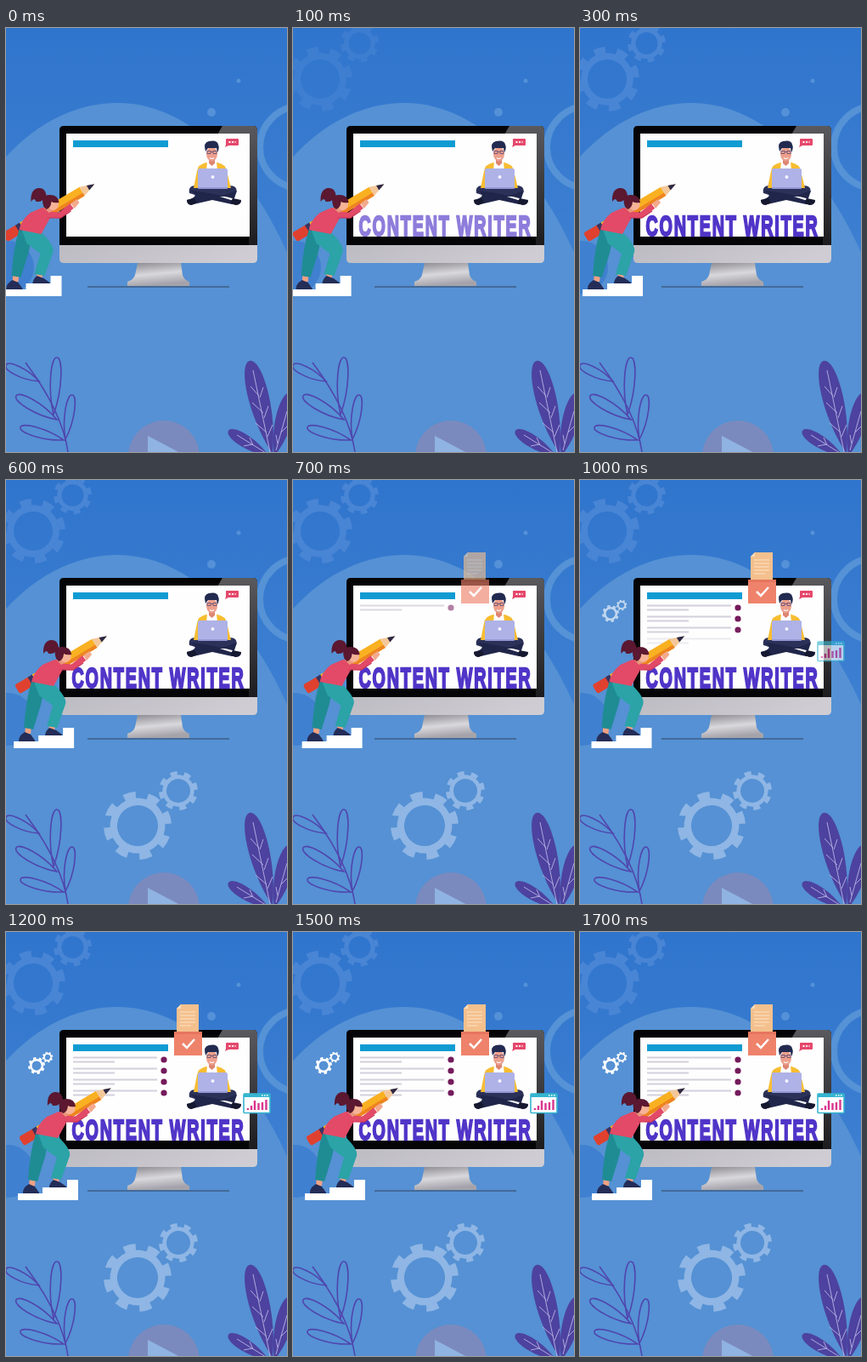
Animation of 331x498 px, one loop 1900 ms. Source, as an HTML page:

```html
<!DOCTYPE html>
<html lang="en">
<head>
<meta charset="utf-8">
<title>Content writer</title>
<style>
  html, body { margin: 0; width: 100%; height: 100%; overflow: hidden; background: #5591d4; }
  svg { display: block; width: 331px; height: 498px; }
  #title { font: bold 32.5px "Liberation Sans", Arial, sans-serif; letter-spacing: 3px; }
</style>
</head>
<body>
<svg viewBox="0 0 331 498">
  <defs>
    <linearGradient id="sky" x2="0" y2="1">
      <stop stop-color="#3075cd"/><stop offset=".6" stop-color="#3f81d2"/>
    </linearGradient>
    <linearGradient id="chin" x2="1" y2=".2">
      <stop stop-color="#bdbbc2"/><stop offset="1" stop-color="#cfcdd3"/>
    </linearGradient>
    <linearGradient id="stand" x2=".25" y2="1">
      <stop stop-color="#8b8990"/><stop offset=".55" stop-color="#d9d8dc"/><stop offset="1" stop-color="#a5a3aa"/>
    </linearGradient>
    <linearGradient id="glare" x2="0" y2="1">
      <stop stop-color="#5a5a5e"/><stop offset="1" stop-color="#1c1c1f"/>
    </linearGradient>
  </defs>

  <rect width="331" height="498" fill="url(#sky)"/>
  <path d="M-5 157C35 110 85 88 131 88C230 88 300 190 336 275V498H-5Z" fill="#5591d4"/>
  <circle cx="2" cy="281" r="31" fill="#4080d0"/>
  <circle cx="347" cy="140" r="48" fill="none" stroke="#5592d6" stroke-width="8"/>
  <g fill="#5591d8"><circle cx="242" cy="99" r="5"/><circle cx="274" cy="62" r="2.5"/></g>
  <circle cx="186" cy="503" r="42" fill="#7b8abe"/>
  <path d="M167 479v42l40-21z" fill="#8fb3e2"/>

  <g id="topGears"></g>
  <g id="lowGears"></g>
  <g id="plants"></g>

  <!-- monitor -->
  <path d="M96 304H263" stroke="#33425f"/>
  <path d="M155 276H206L208 290Q209 295 216 298V303H143V298Q151 295 152 290Z" fill="url(#stand)"/>
  <path d="M63 254H296V271Q296 276 291 276H68Q63 276 63 271Z" fill="url(#chin)"/>
  <path d="M63 255V120Q63 115 68 115H291Q296 115 296 120V255Z" fill="#050507"/>
  <path d="M255 115H291Q296 115 296 120V255H286V125H249Z" fill="url(#glare)"/>
  <path d="M71 124H287V245H71Z" fill="#fefefe"/>
  <path d="M79 132H191V140H79Z" fill="#109bd2"/>
  <g id="rows"></g>

  <!-- man with laptop -->
  <path d="M226 185Q214 184 216 194L229 198H256L271 194Q274 184 260 185Z" fill="#2b3158"/>
  <path d="M217 191Q243 193 277 203Q276 208 266 207L243 202L221 207Q213 207 213 202Q230 198 217 191ZM272 191L252 198L268 203Z" fill="#20264a"/>
  <path d="M213 202L222 200L225 205L219 208Q213 208 213 202ZM277 202L267 200L264 205L270 208Q277 208 277 202Z" fill="#15182f"/>
  <path d="M236 158Q226 160 225 168L221 188H265L260 168Q259 160 249 158Z" fill="#f7bd32"/>
  <path d="M237 157H248L249 168H236Z" fill="#fff"/>
  <path d="M239 151H246V159L242.500 162L239 159Z" fill="#dd8674"/>
  <ellipse cx="242.500" cy="148" rx="6.500" ry="8.500" fill="#ec9f8c"/>
  <path d="M235 145Q232 134 239 133Q249 131 250 137Q252 141 249 146L248 141H238Z" fill="#222a50"/>
  <g fill="none" stroke="#5c4b74" stroke-width=".8">
    <path d="M237 144.500h4v3h-4zM244 144.500h4v3h-4zM241 145.500h3"/>
    <path d="M240 152.500q2.500 2 5 0" stroke="#fff" stroke-width="1.200"/>
  </g>
  <rect x="226" y="165" width="35" height="24" rx="2" fill="#aeb2e6"/>
  <path d="M226 188H261" stroke="#8b90cf" stroke-width="1.500"/>
  <circle cx="243.500" cy="175" r="2" fill="#f4f4ff"/>
  <path d="M260 130H273Q274 130 274 131V137Q274 138 273 138H262L258 140L259 137V131Q259 130 260 130Z" fill="#e5476b"/>
  <path d="M262.500 134h8" stroke="#fff" stroke-width="2" stroke-dasharray="2 1.500"/>

  <g id="title">
    <text transform="translate(77.500 243.500) scale(.607 1)" fill="#5035c8" stroke="#5035c8" stroke-width="1.900" vector-effect="non-scaling-stroke">CONTENT WRITER</text>
  </g>

  <g id="card">
    <path d="M206 85H227V119H201V90Z" fill="#f4c08d"/>
    <path d="M206 85V90H201Z" fill="#fbdcb9"/>
    <path d="M205 94H223M205 98H223M205 102H223M205 106H223M205 110H218" stroke="#fde4c6"/>
    <path d="M198 117H231V145H198Z" fill="#ef826b"/>
    <path d="M198 117H231V120H198Z" fill="#e6765f"/>
    <path d="M208 131L213 136L222 126" fill="none" stroke="#fff" stroke-width="2.500"/>
  </g>

  <g id="whiteGears"></g>

  <g id="chart">
    <rect x="280" y="190" width="31" height="22.500" rx="1" fill="#fff" stroke="#35b5cf" stroke-width="1.600"/>
    <path d="M280 190H311V194H280Z" fill="#35b5cf"/>
    <path d="M301 192h8" stroke="#fff" stroke-width="1.400" stroke-dasharray="1.500 1.500"/>
    <path d="M285 209v-2M289 209v-5M293 209v-11M297.500 209v-8M302 209v-9M306.500 209v-12" stroke="#d9358f" stroke-width="2.400"/>
  </g>

  <!-- woman pushing the pencil, at rest -->
  <g id="woman">
    <path d="M14 315V307H43V300H72V291H85V315Z" fill="#fff"/>
    <g transform="translate(18 246) rotate(-30.700)">
      <path d="M3 -6H20V6H3Q0 6 0 3V-3Q0 -6 3 -6Z" fill="#e0412f"/>
      <path d="M18 -6H24V6H18Z" fill="#383461"/>
      <path d="M24 -6H106V6H24Z" fill="#f9b021"/>
      <path d="M24 2H106V6H24Z" fill="#ee8420"/>
      <path d="M106 -6L123 0L106 6Z" fill="#f3c799"/>
      <path d="M114 -3.200L123 0L114 3.200Z" fill="#2b2642"/>
    </g>
    <path d="M28 288h7l-1 10h-7zM56 286h7l-1 9h-7z" fill="#f0a183"/>
    <path d="M27 296L34 299L39 306V307H20Q19 301 27 296ZM56 291L64 294L71 299V300H51Q51 295 56 291Z" fill="#242d57"/>
    <path d="M35 237L51 241L46 264L37 293L26 291Q28 258 35 237Z" fill="#1f8c94"/>
    <path d="M38 237L60 239Q77 255 75 263L65 291L53 289L60 265L44 253Z" fill="#2ba3a7"/>
    <path d="M62 211Q70 211 75 217Q68 229 61 242L35 237Q37 226 48 217Z" fill="#e24a67"/>
    <path d="M67 219L83 220L97 209" fill="none" stroke="#e24a67" stroke-width="7" stroke-linejoin="round"/>
    <path d="M69 223L84 223L96 215" fill="none" stroke="#c73657" stroke-width="1.200"/>
    <path d="M96 206L103 201L106 205L100 212Z" fill="#f3a98c"/>
    <path d="M66 207H76V214L70 217L65 212Z" fill="#e9967b"/>
    <ellipse cx="75" cy="207" rx="6.500" ry="7" fill="#f6b397"/>
    <path d="M64 210Q59 196 71 196Q81 196 82 205Q76 206 73 204Q72 212 67 213Z" fill="#5b1830"/>
    <path d="M67 197Q66 187 57 188Q48 190 49 204Q53 198 55 204Q63 205 67 197Z" fill="#5b1830"/>
  </g>
</svg>
<script>
const LOOP = 1900, STEP = 100, LAST = 1700;
const $ = id => document.getElementById(id);
const add = (id, markup) => $(id).insertAdjacentHTML('beforeend', markup);

// A gear is a solid ring with eight teeth dashed around it.
function gear(id, x, y, outer, hole, color) {
  const body = outer * .81;
  const ring = (from, to, extra = '') =>
    `<circle r="${(from + to) / 2}" stroke-width="${to - from}" ${extra}/>`;
  add(id, `<g transform="translate(${x} ${y}) rotate(19)" fill="none" stroke="${color}">
    ${ring(hole, body)}${ring(body - .5, outer, 'pathLength="16" stroke-dasharray="1 1"')}</g>`);
}
gear('topGears', 32, 60, 38, 23, '#4985d5');
gear('topGears', 78.5, 18, 22.5, 13, '#4985d5');
gear('lowGears', 155, 406, 40, 24, '#8fb6e5');
gear('lowGears', 203, 365, 23, 14, '#8fb6e5');
gear('whiteGears', 36, 157, 10, 5.5, '#fff');
gear('whiteGears', 49, 147, 6.3, 3.2, '#fff');

// Round-tipped leaf from base to tip, bulging to both sides.
function leaf(x1, y1, x2, y2, bulge, style) {
  const dx = x2 - x1, dy = y2 - y1, len = Math.hypot(dx, dy);
  const at = (along, side) =>
    `${x1 + dx * along + dy / len * side} ${y1 + dy * along - dx / len * side}`;
  add('plants', `<path d="M${x1} ${y1}C${at(.45, bulge)} ${at(1, bulge * .8)} ${x2} ${y2}C${at(1, -bulge * .8)} ${at(.45, -bulge)} ${x1} ${y1}Z" ${style}/>`);
}
const outline = 'fill="none" stroke="#5046ae" stroke-width="1.6"';
const solid = 'fill="#4d429f"';
add('plants', `<path d="M73 498Q66 450 23 393" ${outline}/>`);
leaf(39, 415, 0, 396, 8, outline);
leaf(60, 460, 12, 432, 9, outline);
leaf(68, 484, 17, 469, 8, outline);
leaf(56, 454, 60, 387, 9, outline);
leaf(70, 483, 78, 431, 8, outline);
leaf(314, 500, 287, 391, 18, solid);
leaf(316, 503, 336, 428, 15, solid);
leaf(310, 503, 262, 473, 11, solid);
add('plants', `<path fill="none" stroke="#b9b5e6" stroke-width=".9" d="M311 498L291 402M307 475l-13-11M303 452l-13-12M298 432l-10-11M308 480l6-14M304 458l5-14M299 434l4-12M318 496L331 450M320 488l-2-10M324 475l7-7M306 499L272 478M290 489l-10 2M291 490l-4-9"/>`);

for (let i = 0; i < 4; i++) {
  const y = 147.5 + 13 * i;
  add('rows', `<g id="row${i}"><path d="M79 ${y}H178M79 ${y + 5}H128" stroke="#d3d0dc" stroke-width="1.9"/></g>
    <circle id="dot${i}" cx="186" cy="${y + 2.5}" r="3.6" fill="#741a5c"/>`);
}

const easeOut = p => 1 - (1 - p) ** 2;
const progress = (t, start, span) => easeOut(Math.min(1, Math.max(0, (t - start) / span)));

function fadeIn(id, t, start, span) {
  $(id).setAttribute('opacity', progress(t, start, span));
}

function draw(t) {
  $('woman').setAttribute('transform', `translate(${-19.5 * (1 - progress(t, 0, 1200))} 0)`);
  fadeIn('title', t, 0, 250);
  fadeIn('topGears', t, 0, 300);
  fadeIn('lowGears', t, 300, 300);
  fadeIn('card', t, 600, 250);
  for (let i = 0; i < 4; i++) {
    fadeIn('row' + i, t, 600 + 120 * i, 180);
    fadeIn('dot' + i, t, 660 + 120 * i, 120);
  }
  fadeIn('whiteGears', t, 900, 250);
  fadeIn('chart', t, 900, 250);
}

// Motion advances ten times a second and rests at the end.
const begin = performance.now();
function tick() {
  const t = (performance.now() - begin) % LOOP;
  draw(Math.min(LAST, Math.floor(t / STEP) * STEP));
  requestAnimationFrame(tick);
}
tick();
</script>
</body>
</html>
```
